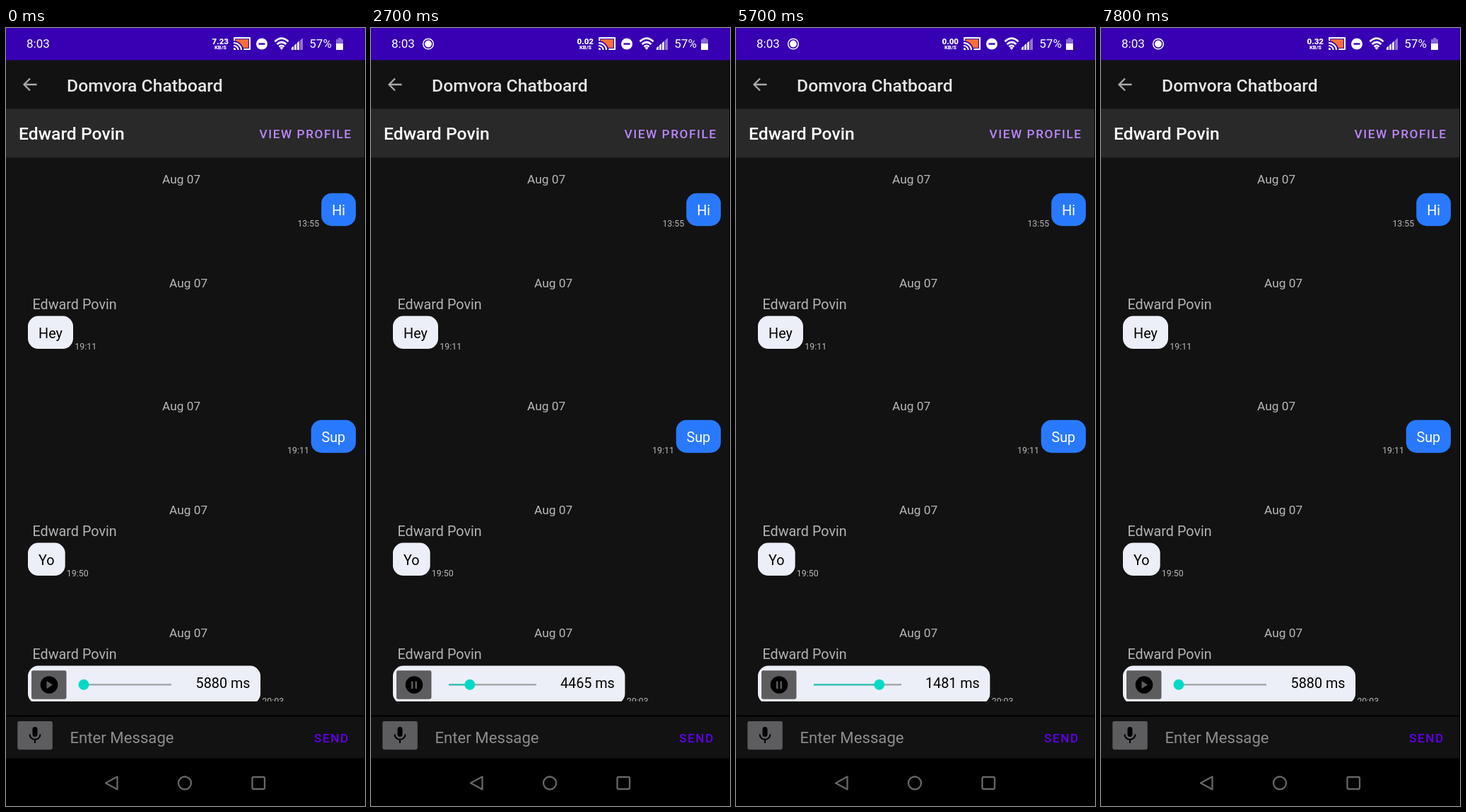
Write an HTML page that moves like this. It is 508 px wide and 1101 px high and loops after 8 s.

```html
<!DOCTYPE html>
<html lang="en">
<head>
<meta charset="utf-8">
<title>Voice message playback</title>
<style>
  html, body { margin: 0; width: 100%; height: 100%; overflow: hidden; background: #000; }
  svg { display: block; font-family: Roboto, sans-serif; }
  text { white-space: pre; }
  .title { font-size: 24.7px; font-weight: 500; }
  .button { font-size: 17.3px; font-weight: 500; letter-spacing: 1.54px; }
  .date { font-size: 17.3px; fill: #b8b8b8; }
  .name { font-size: 19.8px; fill: #b3b3b3; }
  .body { font-size: 19.8px; }
  .bubble { font-size: 19.8px; text-anchor: middle; }
  .time { font-size: 12.4px; fill: #b8b8b8; }
  .status { font-size: 17px; fill: #fff; }
  .rate { font-weight: 800; fill: #fff; text-anchor: middle; }
</style>
</head>
<body>
<svg width="508" height="1101" viewBox="0 0 508 1101">
  <defs>
    <clipPath id="list"><rect y="183" width="508" height="770"/></clipPath>
    <clipPath id="key"><rect x="36" y="909.300" width="49.500" height="40.400" rx="2.400"/></clipPath>
  </defs>
  <rect width="508" height="1101" fill="#121212"/>

  <!-- status bar -->
  <rect width="508" height="45.500" fill="#3700b3"/>
  <text class="status" x="29" y="28">8:03</text>
  <g id="rec">
    <circle cx="81" cy="22.500" r="7.300" fill="none" stroke="#fff" stroke-width="1.500"/>
    <circle cx="81" cy="22.500" r="4.900" fill="#fff"/>
  </g>
  <text class="rate" id="rate" x="303.300" y="22.500" font-size="11.500"></text>
  <text class="rate" x="303.500" y="30" font-size="7.500">KB/S</text>
  <g transform="translate(321 10) scale(1.09 1)" fill="#fff">
    <path d="M4 6V8.400C8.300 9.500 12 13 13.600 18H20V6Z" fill="#ff6d3a"/>
    <path d="M1 18V21H4A3 3 0 0 0 1 18ZM1 14V16A5 5 0 0 1 6 21H8A7 7 0 0 0 1 14ZM1 10V12A9 9 0 0 1 10 21H12A11 11 0 0 0 1 10Z"/>
    <path d="M2 8V4H22V20H14" fill="none" stroke="#fff" stroke-width="1.900"/>
  </g>
  <circle cx="362" cy="22.500" r="8" fill="#fff"/>
  <rect x="357.500" y="21.300" width="9" height="2.400" fill="#3700b3"/>
  <path d="M380.500 19.300Q390 10 399.500 19.300M383.500 23Q390 17 396.500 23M386.500 26.500Q390 23.300 393.500 26.500" fill="none" stroke="#fff" stroke-width="2.700"/>
  <path d="M387.500 28Q390 26 392.500 28L390 31Z" fill="#fff"/>
  <path d="M404 31V28L407 25.500V31ZM408 31V24.500L411 22V31ZM412 31V21L415 18.500V31Z" fill="#fff"/>
  <path d="M416 31V17.500L420 14V31Z" fill="#fff" opacity=".45"/>
  <text class="status" x="429.300" y="28">57%</text>
  <path d="M467 16H470V14H474.500V16H477V31H467Z" fill="#fff" opacity=".4"/>
  <rect x="467" y="22" width="10" height="9" fill="#fff"/>

  <!-- app bar and contact header -->
  <path d="M43.500 80H26M34 71.500L25.500 80L34 88.500" fill="none" stroke="#aaa" stroke-width="2.300"/>
  <text class="title" x="86" y="89.500" fill="#e6e6e6">Domvora Chatboard</text>
  <rect y="114.300" width="508" height="69" fill="#292929"/>
  <text class="title" x="18" y="158" fill="#fff">Edward Povin</text>
  <text class="button" x="358.500" y="156" fill="#bb86fc">VIEW PROFILE</text>

  <!-- conversation -->
  <g clip-path="url(#list)">
    <g id="rows"></g>
    <rect id="bubble" x="31" y="902.600" height="54" rx="14.800" fill="#eceff8"/>
    <rect x="36" y="909.300" width="49.500" height="40.400" rx="2.400" fill="#5d5d5f"/>
    <circle id="ripple" cx="61" cy="929.500" fill="#fff" clip-path="url(#key)"/>
    <circle cx="61" cy="929.500" r="12.300"/>
    <path id="icon" fill="#5d5d5f"/>
    <path d="M110 929.300H234" stroke="#a6a9ab" stroke-width="2.400"/>
    <path id="done" stroke="#3cc4b6" stroke-width="2.400"/>
    <circle id="knob" cy="929.300" r="7.500" fill="#03dac5"/>
    <text class="body" id="left" y="934"></text>
    <text class="time" id="stamp" y="957">20:03</text>
  </g>

  <!-- message input -->
  <rect y="972.500" width="508" height="2" fill="#000"/>
  <rect x="16.300" y="981" width="49.500" height="40.200" rx="2.400" fill="#5d5d5f"/>
  <rect x="37.500" y="989" width="7" height="14" rx="3.500"/>
  <path d="M33.500 999.500A7.500 7.500 0 0 0 48.500 999.500M41 1007V1012" fill="none" stroke="#000" stroke-width="2"/>
  <text x="90.400" y="1012" font-size="22.200" fill="#8c8c8c">Enter Message</text>
  <text class="button" x="436" y="1010.600" fill="#6200ee">SEND</text>

  <!-- navigation bar -->
  <rect y="1033.500" width="508" height="68" fill="#000"/>
  <g fill="none" stroke="#666" stroke-width="2.300" stroke-linejoin="round">
    <path d="M157.500 1059.500V1077.500L141 1068.500Z"/>
    <circle cx="253" cy="1068.500" r="9"/>
    <rect x="348.500" y="1060" width="17.500" height="17" rx="2"/>
  </g>
  <rect x="507" y="45" width="1" height="1056" fill="#000"/>
</svg>
<script>
const LOOP = 8000, STEP = 100, LENGTH = 5880;
const PLAY = 1300, STOP = 7200, TAP = 900;
const $ = id => document.getElementById(id);
const set = (el, attrs) => {
  for (const k in attrs) el.setAttribute(k, attrs[k]);
};

const add = (tag, attrs, content = '') => {
  const el = document.createElementNS('http://www.w3.org/2000/svg', tag);
  set(el, attrs);
  el.textContent = content;
  $('rows').append(el);
};
const label = (cls, x, y, content, fill) =>
  add('text', fill ? { class: cls, x, y, fill } : { class: cls, x, y }, content);

function message(y, mine, content, x, width, time, timeX) {
  label('date', mine ? 221 : 231, y, 'Aug 07');
  if (!mine) label('name', 37.5, y + 31, 'Edward Povin');
  if (!content) return;
  const top = y + (mine ? 13.7 : 40.6);
  add('rect', { x, y: top, width, height: 46.5, rx: 14.8, fill: mine ? '#2979ff' : '#eceff8' });
  label('bubble', x + width / 2, top + 31.3, content, mine ? '#fff' : '#000');
  label('time', timeX, top + 47.3, time);
}
message(220, true, 'Hi', 446.2, 48.8, '13:55', 412.4);
message(367, false, 'Hey', 31, 64, '19:11', 97.3);
message(541, true, 'Sup', 431.7, 63.3, '19:11', 398);
message(688, false, 'Yo', 31, 52.7, '19:50', 85.8);
message(862, false);

// [time, milliseconds of audio left]
const clock = [[1285, LENGTH], [2700, 4465], [3800, 3347], [4900, 2272], [6400, 788], [7188, 0]];
function audioLeft(t) {
  const i = Math.max(1, clock.findIndex(([at]) => t <= at));
  const [t0, v0] = clock[i - 1], [t1, v1] = clock[i];
  return Math.round(v0 + (v1 - v0) * (t - t0) / (t1 - t0));
}

const PLAY_ICON = 'M57.500 924V935L66 929.500Z';
const PAUSE_ICON = 'M57 924.500H59.500V935H57ZM62.500 924.500H65V935H62.500Z';

function draw(t) {
  const playing = t >= PLAY && t < STOP;
  const left = playing ? audioLeft(t) : LENGTH;
  const shift = playing ? 0 : 0.7;
  const right = 359.4 + shift - 11.1 * (4 - String(left).length);
  const x = 110 + 124 * (1 - left / LENGTH);

  $('left').textContent = left + ' ms';
  set($('left'), { x: 267.9 + shift });
  set($('bubble'), { width: right - 31 });
  set($('stamp'), { x: right + 2.3 });
  set($('knob'), { cx: x });
  set($('done'), { d: `M110 929.300H${x}` });
  set($('icon'), { d: playing ? PAUSE_ICON : PLAY_ICON });

  const p = (t - TAP) / 500;
  const on = p >= 0 && p < 1;
  set($('ripple'), { r: on ? 18 + 90 * p : 0, opacity: on ? 0.18 * (1 - p) : 0 });

  set($('rec'), { opacity: t < 300 ? 0 : 1 });
  $('rate').textContent = t < 700 ? '7.23' : t < 3700 ? '0.02' : t < 6700 ? '0.00' : '0.32';
}

function frame() {
  draw(Math.floor(performance.now() % LOOP / STEP) * STEP);
  requestAnimationFrame(frame);
}
frame();
</script>
</body>
</html>
```
